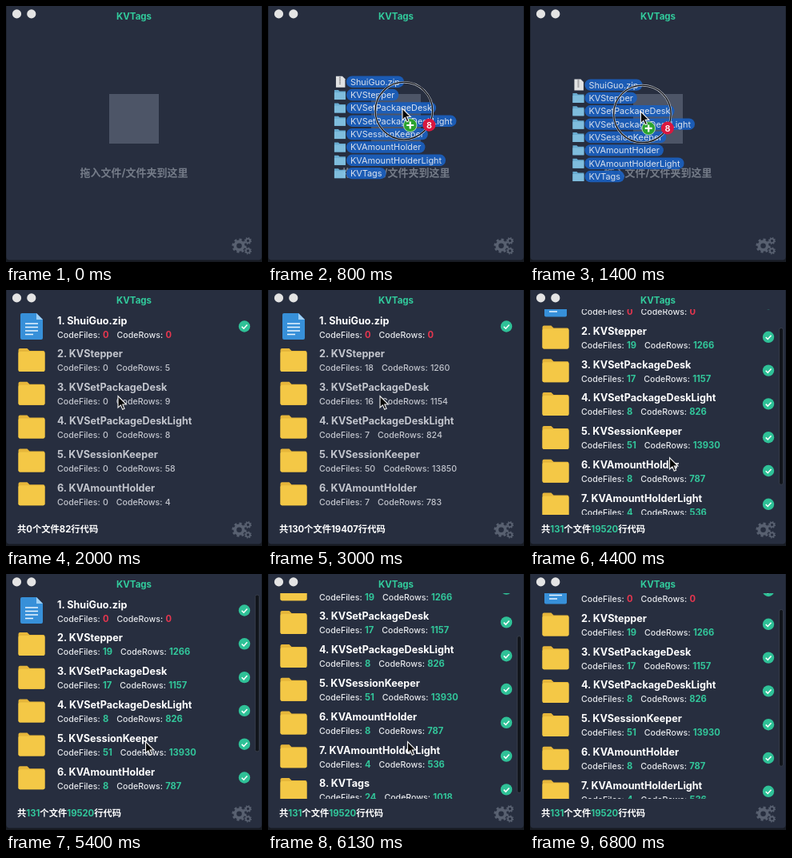
Recreate the animation shown at these times as an HTML page. Size 320x320 px, loop 6.87 s.

```html
<!DOCTYPE html>
<html lang="zh">
<head>
<meta charset="utf-8">
<style>
  html, body { margin: 0; width: 100%; height: 100%; overflow: hidden; background: #171b22; }
  svg { display: block; width: 100%; height: 100%; }
  text { font-family: Inter, "Noto Sans CJK SC", "Noto Sans CJK JP", "Noto Sans CJK", sans-serif; }
  .name { font-size: 12.6px; font-weight: 700; }
  .info { font-size: 10.6px; font-weight: 500; }
  .label { font-size: 10.9px; fill: #e6eefa; }
  .total { font-size: 11.3px; font-weight: 700; fill: #fff; }
  .total .num { font-size: 11.3px; }
</style>
</head>
<body>
<svg viewBox="0 0 320 320">
  <defs>
    <clipPath id="view"><rect y="24" width="320" height="257"/></clipPath>
    <g id="folder">
      <path d="M15.500 75q0-2 2-2h9l3 3h17q2 0 2 2v22q0 2-2 2h-29q-2 0-2-2z" fill="#e6b63a"/>
      <rect x="15.500" y="77" width="33" height="25" rx="2" fill="#f4c846"/>
    </g>
    <g id="doc">
      <path d="M20 29h18l8 8v23q0 2-2 2H20q-2 0-2-2V31q0-2 2-2z" fill="#3790d9"/>
      <path d="M38 29l8 8h-8z" fill="#9fd0f5"/>
      <path d="M24 42h16M24 46.500h16M24 51h16M24 55.500h10" stroke="#eaf5ff" stroke-width="1.700"/>
    </g>
    <g id="check">
      <circle cx="298" cy="45.500" r="7.200" fill="#2fc197"/>
      <path d="M294.700 45.700l2.500 2.500 4.300-4.700" fill="none" stroke="#fff" stroke-width="1.500"/>
    </g>
    <g id="gear" fill="none" stroke="#586070">
      <circle r="5.200" stroke-width="3.800"/>
      <circle r="7.700" stroke-width="2.800" pathLength="16" stroke-dasharray="1"/>
    </g>
  </defs>

  <rect x=".5" y="-6" width="319" height="323.500" rx="4" fill="#272e3f"/>

  <g id="dropZone">
    <rect x="129" y="110" width="62" height="62" fill="#4d5567"/>
    <text x="160" y="213" text-anchor="middle" font-size="13" font-weight="700" fill="#747b88">拖入文件/文件夹到这里</text>
  </g>

  <g id="results">
    <g clip-path="url(#view)"><g id="list"></g></g>
    <rect id="thumb" x="311.500" width="5" height="196" rx="2.500" fill="#11151b" stroke="#3b4250" stroke-width=".8"/>
    <text class="total" x="14" y="303">共<tspan class="num" id="sumFiles"></tspan>个文件<tspan class="num" id="sumRows"></tspan>行代码</text>
  </g>

  <circle cx="13.500" cy="9.900" r="5.600" fill="#e4e4e4"/>
  <circle cx="31.800" cy="9.900" r="5.600" fill="#e4e4e4"/>
  <text x="160" y="17" text-anchor="middle" font-size="11.5" font-weight="700" fill="#32cb9c">KVTags</text>
  <use href="#gear" transform="translate(291.500 299.700)"/>
  <use href="#gear" transform="translate(302.500 293.500) scale(.5)"/>
  <use href="#gear" transform="translate(302.500 306) scale(.5)"/>

  <g id="drag">
    <g id="dragItems" opacity=".93"></g>
    <circle cx="170" cy="131" r="35.800" fill="none" stroke="#c6cad2" stroke-width="2.600"/>
    <circle cx="170" cy="131" r="35.800" fill="none" stroke="#0b0d12" stroke-width="1.300"/>
    <circle cx="177.800" cy="149" r="8.300" fill="#2ba32f" stroke="#d5efd5" stroke-width=".8"/>
    <path d="M173.300 149h9M177.800 144.500v9" stroke="#fff" stroke-width="2.200"/>
    <circle cx="201.500" cy="148.700" r="8" fill="#d9183f"/>
    <text x="201.500" y="152.700" text-anchor="middle" font-size="11" font-weight="600" fill="#fff">8</text>
  </g>
  <path id="cursor" d="M0 0v14.500l3.400-3.100 2.300 5.300 2.400-1-2.300-5.200h4.600z" fill="#090909" stroke="#f2f2f2" stroke-width="1.100"/>
</svg>

<script>
const LOOP = 6870, PITCH = 41.8, DROP = 1650;
const GREEN = '#32c79b', RED = '#e6364f', DIM = '#c2c5cd';

const entries = [
  { name: 'ShuiGuo.zip', files: 0, rows: 0, start: 0, span: 1 },
  { name: 'KVStepper', files: 19, rows: 1266, start: 1868.4, span: 1265 },
  { name: 'KVSetPackageDesk', files: 17, rows: 1157, start: 1837.2, span: 1272 },
  { name: 'KVSetPackageDeskLight', files: 8, rows: 826, start: 1827.2, span: 1272 },
  { name: 'KVSessionKeeper', files: 51, rows: 13930, start: 1871.6, span: 1272.6 },
  { name: 'KVAmountHolder', files: 8, rows: 787, start: 1863.2, span: 1265 },
  { name: 'KVAmountHolderLight', files: 4, rows: 536, start: 1867, span: 1270 },
  { name: 'KVTags', files: 24, rows: 1018, start: 1867, span: 1270 }
];
const total = { files: 131, rows: 19520, start: 1871.6, span: 1273 };

// Keyframes: time, then values
const cursorPath = [
  [70, 400, 105], [400, 270, 120], [730, 181, 128], [800, 168, 128],
  [1250, 136, 131], [1500, 140, 132.5], [3250, 140, 132.5], [3580, 174.5, 209.5],
  [6200, 174.5, 209.5], [6560, 335, 192]
];
const scrollPath = [
  [3720, 0], [4400, 28.5], [4780, 77], [5250, 0],
  [5480, 0], [5980, 77], [6580, 24.5]
];

const $ = id => document.getElementById(id);
const linear = x => x;
const smooth = x => x * x * (3 - 2 * x);
const easeInOut = x => x < .5 ? 4 * x ** 3 : 1 - 4 * (1 - x) ** 3;
const clamp = x => Math.min(1, Math.max(0, x));

function sample(keys, t, ease = linear) {
  const next = keys.findIndex(k => k[0] > t);
  if (next < 0) return keys[keys.length - 1].slice(1);
  if (next === 0) return keys[0].slice(1);
  const a = keys[next - 1], b = keys[next];
  const u = ease((t - a[0]) / (b[0] - a[0]));
  return a.slice(1).map((v, i) => v + (b[i + 1] - v) * u);
}

function add(parent, tag, attrs, text) {
  const el = document.createElementNS('http://www.w3.org/2000/svg', tag);
  for (const key in attrs) el.setAttribute(key, attrs[key]);
  if (text) el.textContent = text;
  return parent.appendChild(el);
}

function buildRow(entry, i) {
  const g = add($('list'), 'g', { transform: `translate(0 ${i * PITCH})` });
  if (i) add(g, 'use', { href: '#folder', y: -PITCH });
  else add(g, 'use', { href: '#doc' });
  entry.title = add(g, 'text', { class: 'name', x: 64, y: 42.6 }, `${i + 1}. ${entry.name}`);
  entry.info = add(g, 'text', { class: 'info', x: 64, y: 59.6 });
  add(entry.info, 'tspan', {}, 'CodeFiles:');
  entry.filesEl = add(entry.info, 'tspan', { dx: 3.3 });
  add(entry.info, 'tspan', { dx: 10 }, 'CodeRows:');
  entry.rowsEl = add(entry.info, 'tspan', { dx: 3.3 });
  entry.check = add(g, 'use', { href: '#check' });
}

function buildDragItem(entry, i) {
  const y = 94.7 + i * 16.35;
  const g = add($('dragItems'), 'g', { transform: `translate(0 ${y})` });
  if (i) {
    add(g, 'path', { d: 'M83-6h5l1.500 1.500H97V6H83z', fill: '#6db5dc' });
    add(g, 'path', { d: 'M83-3h14V6H83z', fill: '#86c8ea' });
  } else {
    add(g, 'path', { d: 'M85-7h8l3.500 3.500V7H85z', fill: '#f0f0f0' });
    add(g, 'path', { d: 'M90-6V3', stroke: '#777', 'stroke-width': 2, 'stroke-dasharray': 1 });
  }
  const pill = add(g, 'rect', { x: 98, y: -7.2, height: 14.4, rx: 7.2, fill: '#1b5fbd' });
  const label = add(g, 'text', { class: 'label', x: 103, y: 3.9 }, entry.name);
  pill.setAttribute('width', label.getComputedTextLength() + 10);
}

function show(el, visible) {
  el.style.display = visible ? '' : 'none';
}

function setCount(item, t) {
  const p = easeInOut(clamp((t - item.start) / item.span));
  item.filesEl.textContent = Math.floor(item.files * p);
  item.rowsEl.textContent = Math.floor(item.rows * p);
  return t >= item.start + item.span;
}

function drawRow(entry, t) {
  const done = setCount(entry, t);
  entry.title.style.fill = done ? '#fff' : DIM;
  entry.info.style.fill = done ? '#e6e8ec' : DIM;
  for (const el of [entry.filesEl, entry.rowsEl]) {
    el.style.fill = done ? (entry.rows ? GREEN : RED) : DIM;
    el.style.fontWeight = done ? 700 : 500;
    el.style.fontSize = done ? '11.2px' : '10.6px';
  }
  show(entry.check, done);
}

function draw(t) {
  const [x, y] = sample(cursorPath, t);
  const [scroll] = sample(scrollPath, t, smooth);
  const dropped = t >= DROP;

  show($('dropZone'), !dropped);
  show($('results'), dropped);
  show($('drag'), t >= 70 && !dropped);
  show($('cursor'), t >= 70);
  $('drag').setAttribute('transform', `translate(${x - 168} ${y - 128})`);
  $('cursor').setAttribute('transform', `translate(${x} ${y})`);

  $('list').setAttribute('transform', `translate(0 ${-scroll})`);
  $('thumb').setAttribute('y', 26 + scroll * .75);
  show($('thumb'), t >= 3720);

  entries.forEach(entry => drawRow(entry, t));
  const done = setCount(total, t);
  total.filesEl.style.fill = total.rowsEl.style.fill = done ? GREEN : '#fff';
}

total.filesEl = $('sumFiles');
total.rowsEl = $('sumRows');
entries.forEach(buildRow);
entries.forEach(buildDragItem);

const origin = performance.now();
function tick() {
  draw((performance.now() - origin) % LOOP);
  requestAnimationFrame(tick);
}
tick();
</script>
</body>
</html>
```
